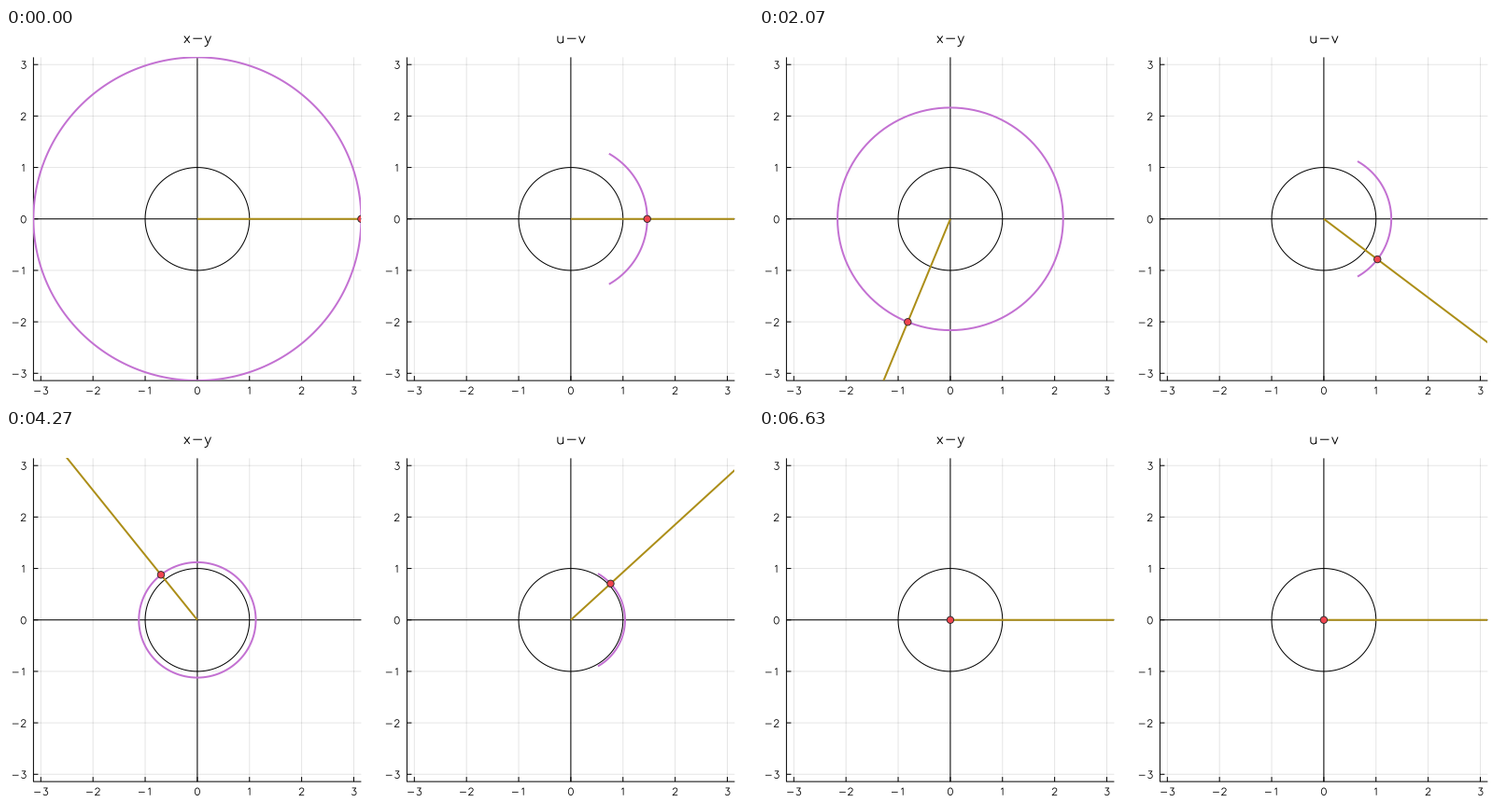
These frames come from a looping animation (800 by 400 pixels, 6660 ms). A matplotlib script:

```python
import numpy as np
import matplotlib.pyplot as plt
from matplotlib.animation import FuncAnimation
from matplotlib.patches import Ellipse

W, H, DPI = 800, 400, 100
STEP_MS, LOOP_MS, POSES = 20, 6660, 200
PX = 72 / DPI                       # one pixel in points
PURPLE, GOLD, RED = "#c371d2", "#ac8e18", "#f0444f"
BOX_W, TOP, BOTTOM = 351, 31.4, 378.1
UNIT_X, UNIT_Y = BOX_W / (2 * np.pi), (BOTTOM - TOP) / (2 * np.pi)

turn = np.linspace(0, 2 * np.pi, 241)
arc = np.linspace(-np.pi / 3, np.pi / 3, 121)


def bow(cx, cy, rx, ry, start, end):
    """Points along an elliptic arc, angles in degrees."""
    a = np.radians(np.linspace(start, end, 25))
    return list(zip(cx + rx * np.cos(a), cy + ry * np.sin(a)))


# Single-stroke lettering: advance width, then strokes; capitals are 21 high.
GLYPHS = {
    "0": (20, bow(10, 10.5, 7, 10.5, 0, 360)),
    "1": (20, [(6, 17), (11, 21), (11, 0)]),
    "2": (20, bow(10, 15.5, 6, 5.5, 180, -35) + [(3, 0), (17, 0)]),
    "3": (20, [(5, 21), (16, 21), (10, 13)] + bow(10, 6.5, 7, 6.5, 70, -150)),
    "-": (26, [(4, 9), (22, 9)]),
    "x": (17, [(3, 14), (14, 0)], [(14, 14), (3, 0)]),
    "y": (16, [(2, 14), (8, 0)], [(14, 14), (8, 0)] + bow(1, 0, 7, 7, -30, -90)),
    "u": (19, [(4, 14)] + bow(9.5, 5, 5.5, 5, 180, 360), [(15, 14), (15, 0)]),
    "v": (16, [(2, 14), (8, 0), (14, 14)]),
}

fig = plt.figure(figsize=(W / DPI, H / DPI), dpi=DPI, facecolor="white")
page = fig.add_axes([0, 0, 1, 1])
page.set(xlim=(0, W), ylim=(H, 0))
page.axis("off")


def line(ax, xs, ys, color="black", width=1, **kw):
    """A line of the given pixel width, kept at its exact position."""
    return ax.plot(xs, ys, color=color, lw=width * PX, snap=False,
                   solid_capstyle="butt", **kw)[0]


def write(text, x, base, scale, align=0.5, width=0.8):
    """Letter text in page pixels; align 0.5 centres it, 1 sets it right."""
    x -= align * scale * sum(GLYPHS[c][0] for c in text)
    for c in text:
        advance, *strokes = GLYPHS[c]
        for stroke in strokes:
            px, py = np.array(stroke).T
            line(page, x + scale * px, base - scale * py, width=width)
        x += scale * advance


def make_panel(left, title):
    right, cx, cy = left + BOX_W, left + BOX_W / 2, (TOP + BOTTOM) / 2
    write(title, cx, 16, 0.53, width=1)
    for n in range(-3, 4):
        x, y = cx + n * UNIT_X, cy - n * UNIT_Y
        line(page, [x, x], [TOP, BOTTOM], alpha=0.1)
        line(page, [left, right], [y, y], alpha=0.1)
        line(page, [x, x], [BOTTOM, BOTTOM - 5])
        line(page, [left, left + 5], [y, y])
        write(str(n), x, 392.7, 0.37)
        write(str(n), left - 7, y + 4.3, 0.37, align=1)
    line(page, [left, left, right], [TOP, BOTTOM, BOTTOM])
    line(page, [cx, cx], [TOP, BOTTOM])
    line(page, [left, right], [cy, cy])

    ax = fig.add_axes([left / W, 1 - BOTTOM / H, BOX_W / W, (BOTTOM - TOP) / H])
    ax.set(xlim=(-np.pi, np.pi), ylim=(-np.pi, np.pi))
    ax.axis("off")
    line(ax, np.cos(turn), np.sin(turn))
    curve = line(ax, [], [], PURPLE, 2)
    ray = line(ax, [], [], GOLD, 2)
    dot = ax.add_patch(Ellipse((0, 0), 7.4 / UNIT_X, 7.4 / UNIT_Y, fc=RED,
                               ec="#2a2a2a", lw=0.9 * PX, zorder=3, snap=False))
    return curve, ray, dot


plane_z = make_panel(29.4, "x-y")
plane_w = make_panel(429.4, "u-v")


def place(panel, radius, angle, span):
    curve, ray, dot = panel
    c, s = np.cos(angle), np.sin(angle)
    curve.set_data(radius * np.cos(span), radius * np.sin(span))
    ray.set_data([0, 10 * c], [0, 10 * s])
    dot.set_center((radius * c, radius * s))


def update(i):
    """Spiral z inwards for one clockwise turn and show its principal cube root."""
    # Poses run at 30 per second, timed to the nearest 10 ms.
    middle = (i + 0.5) * STEP_MS
    t = int((middle + 5) * 0.03) / (POSES - 1)
    radius = np.pi * (1 - t)
    angle = -2 * np.pi * t
    if t > 0.5:
        angle += 2 * np.pi
    place(plane_z, radius, angle, turn)
    place(plane_w, np.cbrt(radius), angle / 3, arc)
    return plane_z + plane_w


anim = FuncAnimation(fig, update, frames=LOOP_MS // STEP_MS, interval=STEP_MS,
                     init_func=lambda: update(0), repeat=True, blit=False)
plt.show()
```
